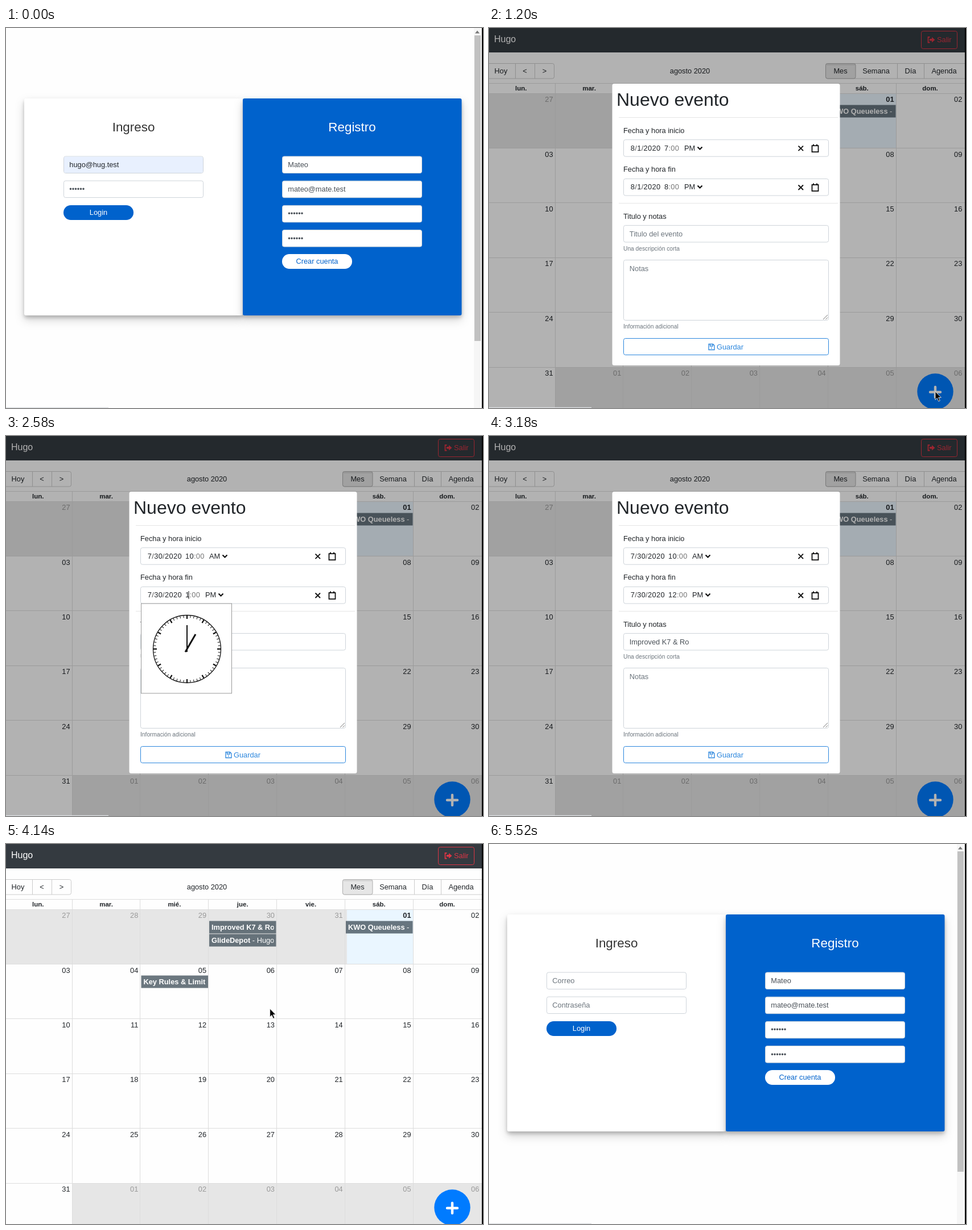
Write an HTML page that moves like this. It is 838x669 px and loops after 5580 ms.

```html
<!DOCTYPE html>
<html lang="es">
<head>
<meta charset="utf-8">
<title>Calendario</title>
<style>
  html, body { margin: 0; width: 100%; height: 100%; overflow: hidden; background: #fefefe; }
  svg { display: block; }
  #stage { width: 838px; height: 669px; font: 12.8px "Liberation Sans", Arial, sans-serif; fill: #212529; }
  text { white-space: pre; }
  .mid { text-anchor: middle; }
  .end { text-anchor: end; }
  .bold { font-weight: bold; }
  .white { fill: #fff; }
  .off { fill: #999; }
  .value { fill: #495057; }
  .hint { fill: #6c757d; }
  .small { font-size: 10.24px; fill: #6c757d; }
  .input { fill: #fff; stroke: #ced4da; }
  .line { stroke: #ddd; }
  .card { filter: drop-shadow(0 4px 3.2px rgba(0,0,0,.2)) drop-shadow(0 7px 8px rgba(0,0,0,.17)); }
  .tool { fill: none; stroke: #ccc; }
  .ink { fill: none; stroke: #111; }
  .red { fill: #dc3545; }
  .save { --edge: #2b86dd; --face: #fff; --text: #2b86dd; }
  .save.hover { --edge: #007bff; --face: #007bff; --text: #fff; }
  .save rect { fill: var(--face); stroke: var(--edge); }
  .save text { fill: var(--text); }
  .save path { fill: none; stroke: var(--text); stroke-width: 1.3; }
</style>
</head>
<body>
<svg id="stage" viewBox="0 0 838 669"></svg>
<script>
const LOOP = 5580, STEP = 60;
const stage = document.getElementById('stage');

const text = (x, y, s, cls = '', more = '') => `<text x="${x}" y="${y}" class="${cls}" ${more}>${s}</text>`;
const rect = (x, y, w, h, more = '') => `<rect x="${x}" y="${y}" width="${w}" height="${h}" ${more}/>`;
const path = (d, more = '') => `<path d="${d}" ${more}/>`;
const group = (id, body, more = '') => `<g id="${id}" ${more}>${body}</g>`;
const input = (x, y, w, h) => rect(x, y, w, h, 'rx="3.2" class="input"');

// Login page
const DOTS = '••••••';

function loginPage() {
  const entry = (x, y, s, cls = 'value') => input(x + .5, y + .5, 245, 29.5) + text(x + 10.3, y + 19.5, s, cls);
  const pill = (x, y, s, face, ink) =>
    rect(x, y, 123, 26, `rx="12.8" fill="${face}"`) +
    text(x + 61.5, y + 17, s, 'mid', `style="fill:${ink}"`);
  return rect(0, 0, 836, 669, 'fill="#fefefe"') +
    rect(822, 0, 13, 669, 'fill="#f6f6f6"') +
    path('M824 9.5L828 4.5L832 9.5Z', 'fill="#777"') +
    '<rect id="thumb" x="823" y="13" width="11" fill="#c1c1c1"/>' +
    rect(32, 124, 384, 382, 'rx="3" fill="#fff" class="card"') +
    rect(416, 124, 384.5, 382, 'rx="3" fill="#0062cc" class="card"') +
    text(224, 182, 'Ingreso', 'mid', 'font-size="22.4" fill="#333"') +
    text(608, 182, 'Registro', 'mid white', 'font-size="22.4"') +
    group('filled',
      entry(101, 225.5, '') + rect(102, 226.5, 244, 28.5, 'rx="2.7" fill="#e8f0fe"') +
      text(111.3, 245, 'hugo@hug.test') + entry(101, 268.5, DOTS)) +
    group('blank', entry(101, 225.5, 'Correo', 'hint') + entry(101, 268.5, 'Contraseña', 'hint')) +
    pill(101, 312, 'Login', '#0062cc', '#fff') +
    ['Mateo', 'mateo@mate.test', DOTS, DOTS].map((s, i) => entry(485, 225.5 + i * 43.2, s)).join('') +
    pill(485, 398, 'Crear cuenta', '#fff', '#0062cc');
}

// Calendar page
const colEnd = i => 116.5 + i * 119.8;
const rowTop = i => 115.5 + i * 96.4;
const two = n => String(n).padStart(2, '0');

function eventBox(id, x, y, title, owner) {
  return group(id,
    `<g opacity=".8">${rect(0, 0, 117.5, 22, 'fill="#465660"')}</g>
     <svg width="113.5" height="22">${text(4, 15, `<tspan class="bold">${title}</tspan> - ${owner}`, 'white')}</svg>`,
    `transform="translate(${x} ${y})"`);
}

function calendarPage() {
  let out = rect(0, 0, 836, 669, 'fill="#fefefe"') +
    rect(0, 0, 836, 43, 'fill="#343a40"') + text(9, 25, 'Hugo', 'white', 'font-size="16"') +
    rect(759.5, 5.5, 63, 31, 'rx="3.2" fill="none" stroke="#dc3545"') +
    path('M774.5 16H771.5V25.5H774.5', 'fill="none" stroke="#dc3545" stroke-width="1.8"') +
    path('M774 19H778V16L783.5 20.7L778 25.5V22.5H774Z', 'class="red"') +
    text(787, 25, 'Salir', 'red');

  out += rect(-5, 62.5, 119.5, 26.5, 'rx="3.2" class="tool"') +
    path('M46.5 62.5V89M80.5 62.5V89', 'class="tool"') +
    rect(591.5, 62.5, 250, 26.5, 'rx="3.2" class="tool"') +
    rect(591.5, 62.5, 52.5, 26.5, 'rx="3.2" fill="#e6e6e6" stroke="#adadad"') +
    path('M593 64.5H643', 'stroke="#d2d2d2" stroke-width="2"') +
    path('M717.5 62.5V89M764.5 62.5V89', 'class="tool"');
  for (const [x, s] of [[21, 'Hoy'], [63, '&lt;'], [97.5, '&gt;'], [353, 'agosto 2020'],
    [617.5, 'Mes'], [680, 'Semana'], [740.5, 'Día'], [799.5, 'Agenda']]) out += text(x, 80.3, s, 'mid');

  out += rect(0, 115.5, 599, 96, 'fill="#e6e6e6"') + rect(599, 115.5, 116.5, 96, 'fill="#eaf6ff"') +
    rect(116.5, 597.5, 719.5, 72, 'fill="#e6e6e6"');
  ['lun.', 'mar.', 'mié.', 'jue.', 'vie.', 'sáb.', 'dom.'].forEach((d, i) =>
    out += text(56.3 + i * 119.8, 110, d, 'mid bold', 'font-size="11.5"'));
  out += path('M0 97.5H836', 'class="line"');
  for (let r = 0; r < 6; r++) out += path(`M0 ${Math.round(rowTop(r)) - .5}H836`, 'class="line"');
  for (let c = 0; c < 6; c++) out += path(`M${Math.round(colEnd(c)) - .5} 97.5V669`, 'class="line"');
  for (let n = 0; n < 42; n++) {
    const day = n - 4;
    const off = day < 1 || day > 31;
    const label = day < 1 ? 31 + day : day > 31 ? day - 31 : day;
    const cls = 'end' + (off ? ' off' : '') + (day === 1 ? ' bold' : '');
    out += text(colEnd(n % 7) - 4, rowTop(Math.floor(n / 7)) + 14.7, two(label), cls);
  }

  out += eventBox('oldEvent', 357, 135.5, 'GlideDepot', 'Hugo') +
    eventBox('todayEvent', 597, 135.5, 'KWO Queueless', 'Hugo') +
    eventBox('nextEvent', 237.5, 231.5, 'Key Rules &amp; Limits', 'Hugo') +
    eventBox('newEvent', 357, 135.5, 'Improved K7 &amp; Routing', 'Hugo') +
    rect(357, 135.5, 117.5, 22, 'id="focus" rx="1" fill="none" stroke="#5a9ae6" stroke-width="2"');

  out += group('erase',
    rect(16, 637, 110, 36, 'rx="3.2" class="red"') +
    path('M25 650.5H35.5M28.5 649.5H32M26.5 653V661H34V653Z', 'fill="#fff" stroke="#fff" stroke-width="1.7"') +
    text(39.5, 660, 'Borrar evento', 'white'));
  return out + '<circle cx="784" cy="640" r="31.7" fill="#007bff"/>' +
    path('M784 632V650M775 641H793', 'stroke="#fff" stroke-width="4.4" stroke-linecap="round"');
}

// Event dialog
function clockFace() {
  let ticks = '';
  for (let i = 0; i < 60; i++) {
    const major = i % 5 === 0;
    ticks += path(`M0 -59V${major ? -53 : -55}`,
      `transform="rotate(${i * 6})" class="ink" stroke-width="${major ? 2.2 : 1}"`);
  }
  return rect(-80.5, -80, 159, 158, 'fill="#fff" stroke="#999"') +
    '<circle r="59.5" class="ink" stroke-width="1.3"/>' + ticks +
    path('M0 5V-42', 'class="ink" stroke-width="2"') +
    path('M0 6V-30', 'id="hourHand" class="ink" stroke-width="3"');
}

function dialog() {
  const dateField = (id, y) =>
    input(236.5, y, 360, 29.5) + group(id, '') +
    path(`M543.5 ${y + 11}L552 ${y + 19.5}M552 ${y + 11}L543.5 ${y + 19.5}`, 'class="ink" stroke-width="1.9"') +
    rect(567.5, y + 10.5, 11, 11, 'class="ink" stroke-width="1.8"') +
    path(`M570 ${y + 8}v3M576 ${y + 8}v3`, 'class="ink" stroke-width="2"');
  return rect(0, 0, 836, 669, 'fill="#000" opacity=".3"') +
    rect(216.5, 98, 400, 496, 'rx="3.5" fill="#fff"') +
    text(224, 136.5, 'Nuevo evento', '', 'font-size="32"') +
    path('M228 157.5H613M228 308.5H613', 'stroke="#e5e5e5"') +
    text(236, 185, 'Fecha y hora inicio') + dateField('start', 196.7) +
    text(236, 253, 'Fecha y hora fin') + dateField('finish', 265.5) +
    text(236, 336, 'Titulo y notas') + input(236.5, 347.5, 360, 29.5) + text(246.8, 367, '', '', 'id="title"') +
    text(236, 392, 'Una descripción corta', 'small') +
    input(236.5, 408.5, 360, 106) + text(246.8, 428, '', '', 'id="notes"') +
    path('M587 513L595 505M591.5 513L595 509.5', 'stroke="#777"') +
    '<circle id="badge" cx="576.5" cy="499" r="8.5" fill="#1b9aa0"/>' +
    text(236, 528.7, 'Información adicional', 'small') +
    group('save', rect(236.5, 546.5, 360, 29, 'rx="3.2"') +
      path('M386 556.5H393.5L396 559V566.5H386ZM388.5 557V560H393V557M391 562.2V564.6', '') +
      text(400, 566, 'Guardar'), 'class="save"') +
    rect(353.2, 202.7, 39, 19, 'id="ring" rx="2" class="ink" stroke-width="2"') +
    path('M321 273V287', 'id="caret" class="ink"') +
    group('clock', clockFace());
}

stage.innerHTML = group('calendar', calendarPage()) + group('dialog', dialog()) + group('login', loginPage()) +
  rect(0, 667.7, 180, 2, 'id="bubble" fill="#dcdfe2"') +
  rect(836, 0, 2, 669, 'fill="#000"') +
  group('cursor',
    path('M0 0V14.5L3.3 11.4L5.8 17.2L8.2 16.2L5.7 10.5H10.3Z', 'id="arrow" fill="#000" stroke="#fff" stroke-width=".8"') +
    path('M0 1.5Q1.2-1 2.6 1.2V7.2Q4 5.8 5.2 7.4Q6.7 6.4 7.8 8Q9.8 7.4 10.2 9.5V13Q10 15 8.6 17.5H1.5L-3.2 11.5Q-4.4 9.2-2.2 9.3L0 11Z',
      'id="hand" fill="#fff" stroke="#000" stroke-width="1.2"'));

const $ = Object.fromEntries([...stage.querySelectorAll('[id]')].map(el => [el.id, el]));

// Time helpers
const within = (t, a, b) => t >= a && t < b;
const show = (el, on) => el.style.display = on ? '' : 'none';
const ramp = (t, a, b) => Math.min(1, Math.max(0, (t - a) / (b - a)));
const latest = (t, list) => list.filter(k => k[0] <= t).pop();
const typed = (s, t, a, b) => s.slice(0, Math.ceil(s.length * ramp(t, a, b)));

const START = [[0, '8/1/2020', 7, 'PM'], [1320, '7/1/2020', 7, 'PM'], [1380, '7/30/2020', 7, 'PM'],
  [1500, '7/30/2020', 10, 'PM'], [1800, '7/30/2020', 10, 'AM']];
const FINISH = [[0, '8/1/2020', 8, 'PM'], [2400, '7/30/2020', 8, 'PM'],
  [2520, '7/30/2020', 1, 'PM'], [2700, '7/30/2020', 12, 'PM']];
const POINTER = [[840, 700, 470], [1020, 784, 640], [1200, 784, 640], [1320, 300, 210], [1560, 325, 214],
  [1740, 363, 224], [1980, 363, 224], [2280, 318, 279], [3480, 430, 480], [3600, 544, 557], [3960, 544, 557],
  [4260, 420, 145], [4380, 420, 145], [4620, 531, 372], [4740, 531, 372], [5040, 72, 652], [5100, 72, 652], [5340, 790, 20]];
const HANDS = [[960, 1200], [3540, 3900], [4200, 4500], [4980, 5160], [5280, 5400]];

function setDate(el, y, [, date, hour, half]) {
  const hourX = 315 + 7 * (date.length - 9);
  const halfX = hourX + 28 + 7 * String(hour).length;
  const slashes = date.replaceAll('/', '<tspan fill="#555">/</tspan>');
  el.innerHTML = text(248.8, y, slashes, '', 'letter-spacing=".35"') +
    text(hourX, y, `${hour}<tspan fill="#777">:00</tspan>`, '', 'letter-spacing=".35"') +
    text(halfX, y, half) +
    path(`M${halfX + 23.5} ${y - 6.5}l4 4l4 -4`, 'class="ink" stroke-width="2.2"');
}

function setEntry(el, hint, value) {
  el.textContent = value || hint;
  el.setAttribute('class', value ? 'value' : 'hint');
}

function pointerAt(t) {
  const i = POINTER.findIndex(p => p[0] > t);
  if (i < 1) return POINTER.at(i).slice(1);
  const [a, x, y] = POINTER[i - 1], [b, u, v] = POINTER[i];
  const k = ramp(t, a, b), e = k * k * (3 - 2 * k);
  return [x + (u - x) * e, y + (v - y) * e];
}

function render(t) {
  const late = t >= 5400;
  show($.login, t < 360 || late);
  show($.filled, !late);
  show($.blank, late);
  $.thumb.setAttribute('height', late ? 564 : 538);
  show($.bubble, t < 3600 || late);

  const added = within(t, 3780, 5100);
  show($.newEvent, added);
  $.oldEvent.setAttribute('transform', `translate(357 ${added ? 158.5 : 135.5})`);
  const picked = within(t, 4320, 5100);
  show($.focus, picked);
  show($.erase, picked);
  $.erase.style.opacity = ramp(t, 4260, 4560);

  const fade = t < 3600 ? ramp(t, 1020, 1200) : t < 3660 ? 1 : t < 3720 ? .37 : 0;
  show($.dialog, fade > 0);
  $.dialog.style.opacity = fade;
  const start = latest(t, START), finish = latest(t, FINISH);
  setDate($.start, 216, start);
  setDate($.finish, 284, finish);
  const sent = t >= 3660;
  setEntry($.title, 'Titulo del evento', sent ? '' : typed('Improved K7 & Routing', t, 3000, 3240));
  setEntry($.notes, 'Notas', sent ? '' : typed('Notas de la clase', t, 3300, 3480));
  show($.badge, t >= 3300);
  $.save.classList.toggle('hover', t >= 3600);
  show($.ring, within(t, 1740, 2220));
  show($.caret, within(t, 2520, 2700));

  const first = within(t, 1500, 2220), second = within(t, 2460, 2940);
  show($.clock, first || second);
  $.clock.setAttribute('transform', `translate(318 ${second ? 375 : 306})`);
  $.hourHand.setAttribute('transform', `rotate(${(second ? finish : start)[2] * 30})`);

  show($.cursor, within(t, 840, 2400) || within(t, 3540, 5400));
  $.cursor.setAttribute('transform', `translate(${pointerAt(t)})`);
  const hand = HANDS.some(([a, b]) => within(t, a, b));
  show($.hand, hand);
  show($.arrow, !hand);
}

function tick() {
  render(Math.floor(performance.now() % LOOP / STEP) * STEP);
  requestAnimationFrame(tick);
}
tick();
</script>
</body>
</html>
```
